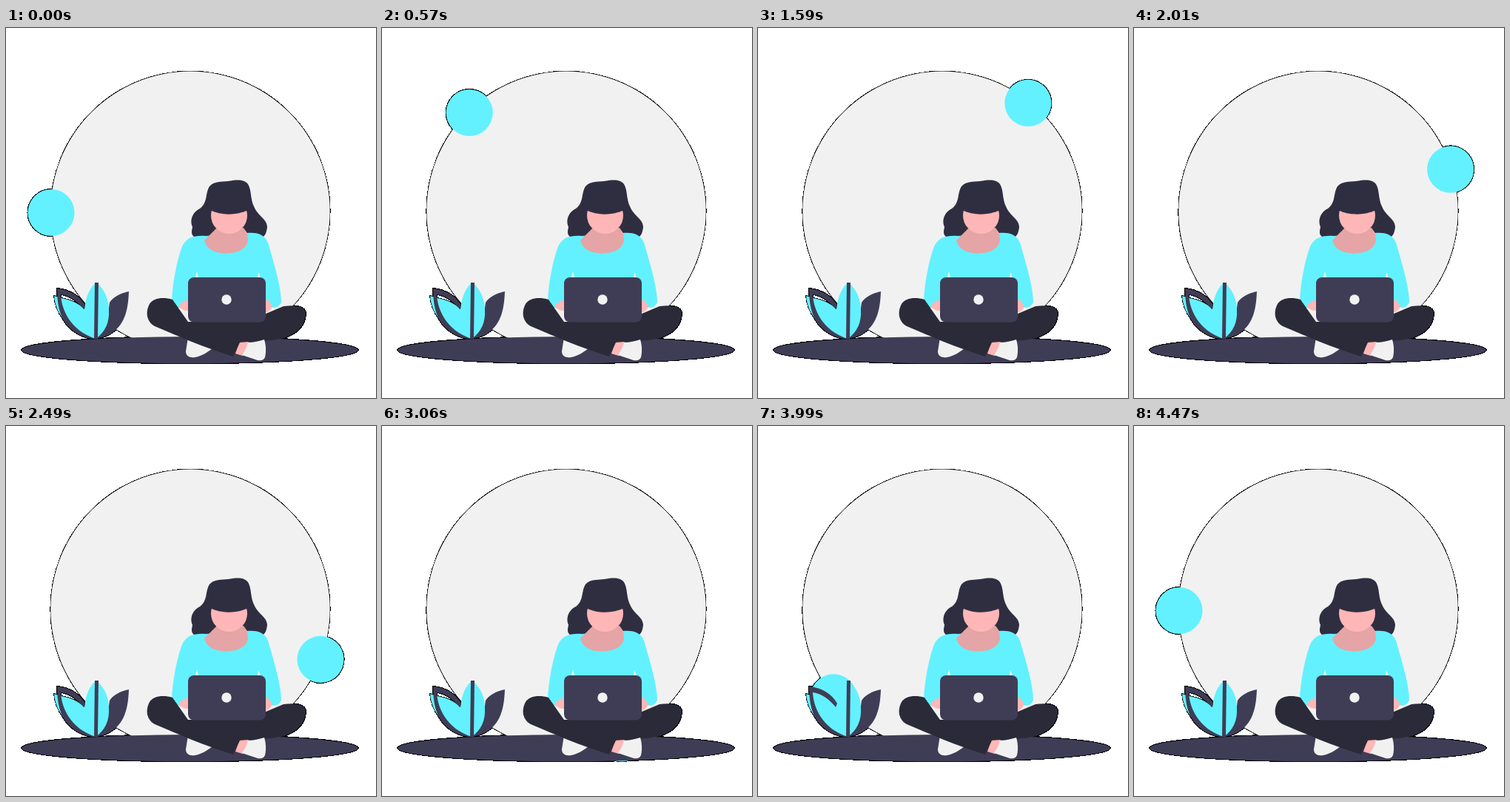
Recreate the animation shown at these times as an HTML page. Size 500 by 500 pixels, loop 4530 ms.

```html
<!DOCTYPE html>
<html lang="en">
<head>
<meta charset="utf-8">
<title>Orbit</title>
<style>
html, body { margin: 0; width: 100%; height: 100%; overflow: hidden; background: #fff; }
svg { display: block; width: 100vw; height: 100vh; }
.fringe { fill: #000; stroke: #000; stroke-width: 1.9; shape-rendering: crispEdges; }
.cyan { fill: #63f1ff; }
.slate { fill: #3f3d56; }
.ink { fill: #2f2e41; }
.leg { fill: #2b2a39; }
.skin { fill: #ffb6b6; }
.pale { fill: #f1f1f1; }
</style>
</head>
<body>
<svg viewBox="0 0 500 500">
  <defs>
    <clipPath id="top"><rect y="35" width="500" height="465"/></clipPath>
    <circle id="disc" cx="249" cy="247.3" r="188.7"/>
    <circle id="ball" cx="61" cy="249.5" r="31.6"/>
    <ellipse id="ground" cx="248.5" cy="435.2" rx="227.3" ry="18.1"/>
    <path id="leafR" d="M166 356C155 358 144 364 140 371L138 386C137 400 128 410 120 420L131 418C159 408 165 385 166 356Z"/>
    <path id="leafL" d="M65 362C66 374 70 384 77 393C87 409 103 418 121 420C134 411 140 398 139 381C139 365 132 352 122 344C113 351 108 362 106 380C98 372 87 367 75 365Z"/>
    <path id="rib" d="M69 352C85 353 100 362 107 375L105 380C97 370 87 362 74 360C75 380 86 408 121 420C103 420 87 410 77 394C71 382 69 367 69 352Z"/>
    <path id="legR" d="M318 400L375 376C392 374 406 376 405 387C404 402 394 413 376 419C355 424 335 423 318 425L250 400Z"/>
  </defs>

  <g class="fringe">
    <use href="#disc"/>
    <g clip-path="url(#top)"><use class="orbit" href="#ball"/></g>
    <use href="#ground"/>
    <use href="#leafR"/><use href="#leafL"/><use href="#rib"/>
    <use href="#legR"/>
  </g>

  <use href="#disc" class="pale"/>
  <g clip-path="url(#top)"><use class="orbit cyan" href="#ball"/></g>
  <use href="#ground" class="slate"/>

  <use href="#leafR" class="slate"/>
  <use href="#leafL" class="cyan"/>
  <use href="#rib" class="slate"/>
  <path class="slate" d="M120 344H125L124 420H119Z"/>

  <!-- hair, face, neck -->
  <path class="ink" d="M275 214C281 207 291 208 300 207C311 205 322 204 327 211C332 219 330 231 335 241C340 254 353 258 353 269C352 277 350 284 342 283C332 279 322 277 300 278C283 276 268 285 256 283C249 280 251 274 252 269C247 257 255 247 262 244C273 236 269 223 275 214Z"/>
  <path class="cyan" d="M270 281C252 280 242 284 237 298C230 318 225 346 224 369C225 377 229 379 237 378L249 368L258 334L259 390H341L342 333L351 372C357 381 370 379 372 370C371 345 362 319 355 293C351 280 342 276 326 277Z"/>
  <path class="pale" d="M258 329L260 337H256ZM341 330L344 337H340Z"/>
  <path fill="#e5a4a5" d="M284 271L268 287C271 300 284 304.500 298 304.500C313 304 325 299 327 287L326 277L321 270Z"/>
  <circle class="skin" cx="301.500" cy="253.500" r="24.500"/>
  <path class="ink" d="M276 246C276 225 286 217 301 217C317 217 327 228 327 246C313 253 291 254 276 246Z"/>

  <!-- legs and feet -->
  <path class="pale" d="M246 418L243 437C243 443 248 446 255 445C263 444 271 439 279 433Z"/>
  <use href="#legR" class="leg"/>
  <path class="skin" d="M315 425L310 440L320 443L328 424Z"/>
  <path class="pale" d="M327 425C335 425 342 423 349 421C351 427 352 437 350 445C348 449 345 450 340 449L319 442C323 436 325 431 327 425Z"/>
  <path class="leg" d="M225 367C212 363 199 365 194 373C188 384 190 397 201 403C232 416 268 432 307 444L316 425L350 397H246Z"/>

  <!-- hands and laptop -->
  <path class="skin" d="M233 375L242 368L250 369V382H244C239 382 236 379 233 375ZM348 368L354 367L360 376C357 382 353 385 348 385Z"/>
  <rect class="slate" x="246" y="337" width="105" height="60.500" rx="8"/>
  <circle class="pale" cx="298" cy="367" r="6.700"/>
</svg>
<script>
const LOOP = 4530, TURN = 4470, STEP = 30;
const parts = document.querySelectorAll('.orbit');
const start = performance.now();

function draw(now) {
  const t = Math.max(0, now - start) % LOOP;
  const held = Math.min(TURN, Math.floor(t / STEP) * STEP);
  const angle = 360 * held / TURN;
  parts.forEach(p => p.setAttribute('transform', `rotate(${angle} 249 249.5)`));
  requestAnimationFrame(draw);
}
draw(start);
</script>
</body>
</html>
```
